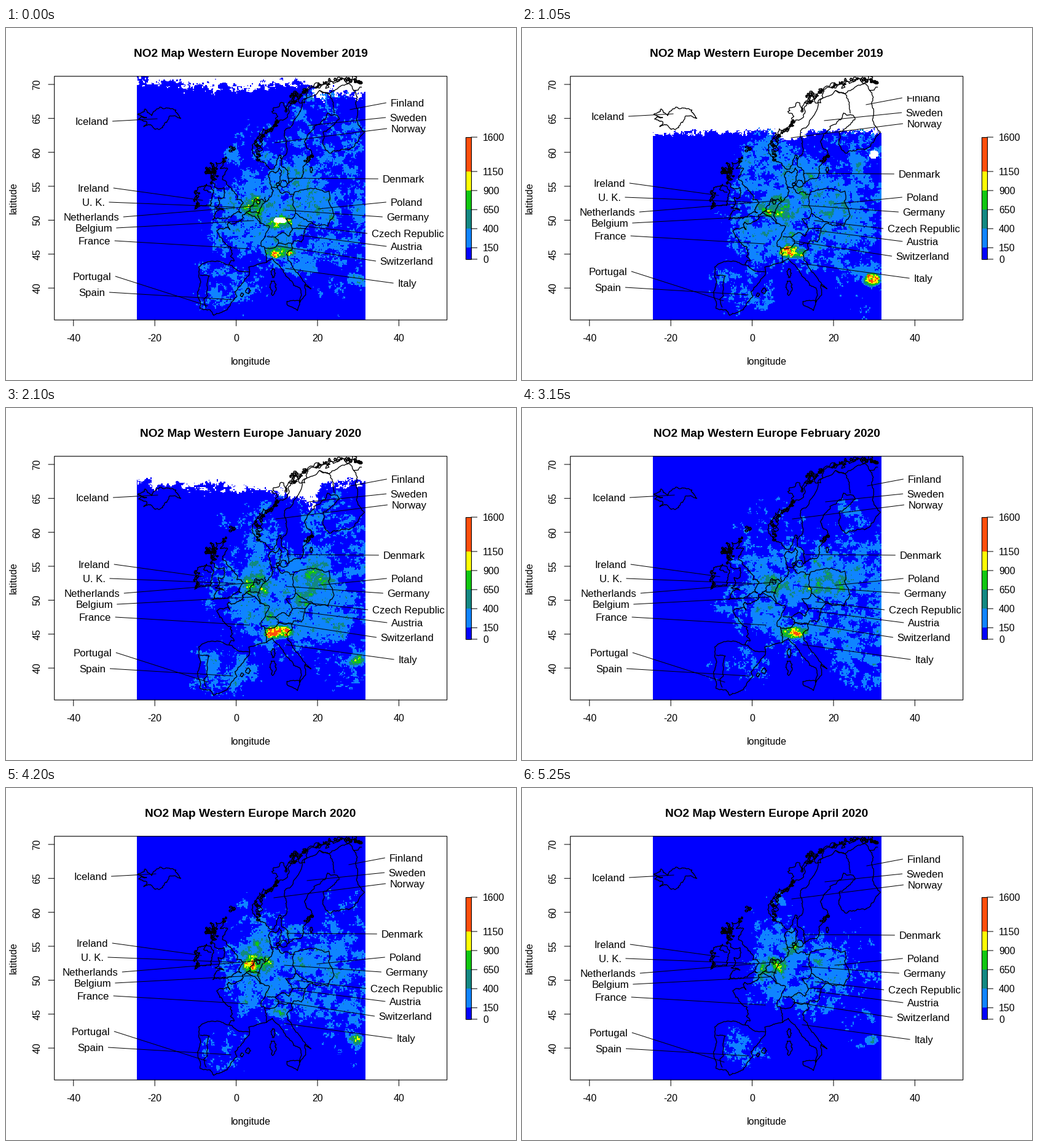
A matplotlib script for the animation above (6300 ms loop, 830 by 574 pixels).

```python
import numpy as np
import matplotlib.pyplot as plt
from matplotlib.animation import FuncAnimation
from matplotlib.colors import to_rgba_array
from matplotlib.patches import Rectangle
from matplotlib.transforms import Affine2D

W, H = 830, 574
PX = 0.72  # points per pixel at 100 dpi
LEFT, RIGHT, TOP, BOTTOM = 212.5, 584, 78.7, 476.1
COLORS = ["#0000ff", "#0f84ff", "#128882", "#10c810", "#ffff00", "#ff4e0a"]
LEVELS = [0, 150, 400, 650, 900, 1150, 1600]

plt.rcParams["font.family"] = "Liberation Sans"
fig = plt.figure(figsize=(8.3, 5.74), dpi=100, facecolor="white")
ax = fig.add_axes([0, 0, 1, 1])
ax.axis("off")


def text(x, y, s, size=16, **kw):
    return ax.text(x, y, s, fontsize=size * PX, va="baseline", **kw)


def line(xs, ys, width=1.0, **kw):
    return ax.plot(xs, ys, color="black", lw=width * PX, snap=False, **kw)[0]


def lon_x(lon):
    return 374.6 + 6.62 * lon


def lat_y(lat):
    return 92 + 11.07 * (70 - lat)


# ---------------------------------------------------------------- field
NX, NY = 248, 265
gx, gy = np.meshgrid(LEFT + (np.arange(NX) + 0.5) * (RIGHT - LEFT) / NX,
                     TOP + (np.arange(NY) + 0.5) * (BOTTOM - TOP) / NY)


def noise(rng, cutoff=0.025, power=0.68):
    """Clumpy random field with unit spread."""
    fx, fy = np.meshgrid(np.fft.fftfreq(NX), np.fft.fftfreq(NY))
    amp = (fx**2 + fy**2 + cutoff**2) ** -power
    n = np.fft.ifft2(np.fft.fft2(rng.normal(size=(NY, NX))) * amp).real
    return (n - n.mean()) / n.std()


def hill(x, y, rx, ry):
    """Flat-topped ellipse that fades out past its radii."""
    d = ((gx - x) / rx) ** 2 + ((gy - y) / ry) ** 2
    return np.exp(-0.25 * d**2)


# centre and radii of the polluted regions
REGIONS = [
    (455, 305, 105, 78),   # continent
    (405, 210, 52, 55),    # North Sea
    (552, 305, 55, 130),   # east
    (360, 425, 52, 45),    # Iberia
    (520, 165, 70, 60),    # Scandinavia
    (410, 290, 24, 17),    # Benelux
    (495, 288, 38, 20),    # Poland
    (442, 366, 18, 8),     # Po valley
    (568, 411, 11, 8),     # Bosphorus
    (443, 318, 18, 10),    # Bavaria
]


def month(seed, heights, reach=1.0, edge=None, ragged=0, hole=None):
    """Colour image of one month; there is no data above edge or in the hole."""
    rng = np.random.default_rng(seed)
    hills = [h * hill(x, y, rx * reach, ry * reach)
             for h, (x, y, rx, ry) in zip(heights, REGIONS)]
    value = np.max(hills, axis=0) * np.exp(0.3 * noise(rng))
    rgba = to_rgba_array(COLORS)[np.clip(value.astype(int), 0, 5)]
    rag = noise(rng, 0.06)
    if edge:
        rgba[gy < np.interp(gx, edge[::2], edge[1::2]) + ragged * rag] = 1
    if hole:
        rgba[hill(*hole) + 0.1 * rag > 0.7] = 1
    return rgba


months = [
    ("November 2019", (0, 8), month(
        11, [1.35, .92, 1, .92, .82, 2.6, 1.8, 3.5, 2.5, 3.4],
        edge=[212, 88, 375, 97, 480, 92, 510, 108, 584, 110], ragged=6,
        hole=(446, 314, 10, 4))),
    ("December 2019", (0, 0), month(
        12, [1.35, .9, 1.15, .9, .85, 2.6, 2, 4.1, 3.8],
        edge=[212, 172, 404, 169, 435, 184, 475, 168, 584, 172], ragged=3,
        hole=(572, 207, 6, 6))),
    ("January 2020", (1, 2), month(
        13, [1.35, .98, 1.05, 1, .85, 2.5, 2, 5.4, 2.3],
        edge=[212, 120, 440, 137, 500, 158, 515, 126, 584, 122], ragged=6)),
    ("February 2020", (2, 2), month(
        14, [1.3, .85, 1.05, .72, .3, 2.5, 1.7, 3.9, 2.1])),
    ("March 2020", (-2, 0), month(
        15, [1.25, .76, 1, .68, .3, 2.9, 1.6, 1.9, 2.3], reach=.88)),
    ("April 2020", (1, 2), month(
        16, [1.25, .72, .74, .85, .3, 2.6, 1.4, 1.2, 1.9], reach=.78)),
]

raster = ax.imshow(months[0][2], extent=(LEFT, RIGHT, BOTTOM, TOP), aspect="auto",
                   interpolation="nearest", zorder=1)
ax.set_xlim(0, W)
ax.set_ylim(H, 0)
ax.autoscale(False)

# ---------------------------------------------------------------- outlines
box = ax.add_patch(Rectangle((78.7, TOP), 639, BOTTOM - TOP, fill=False, ec="black",
                             lw=1.1 * PX, snap=False, zorder=4))
shape_rng = np.random.default_rng(5)


def trace(p, rough, depth=4):
    """Rough line through pixel points, by midpoint displacement."""
    for _ in range(depth):
        step = np.diff(p, axis=0)
        normal = np.column_stack([-step[:, 1], step[:, 0]])
        out = np.empty((2 * len(p) - 1, 2))
        out[::2] = p
        out[1::2] = p[:-1] + step / 2 + normal * shape_rng.normal(0, rough, (len(step), 1))
        p = out
    line(p[:, 0], p[:, 1], 1.3, zorder=3).set_clip_path(box)


def points(coords):
    return np.column_stack([lon_x(np.array(coords[::2])), lat_y(np.array(coords[1::2]))])


def coast(*coords, rough=.15):
    trace(points(coords), rough, 5)


def border(*coords):
    trace(points(coords), .1)


def isle(x, y, rx, ry):
    a = np.linspace(0, 2 * np.pi, 7)
    trace(np.column_stack([x + rx * np.cos(a), y + ry * np.sin(a)]), .18, 3)


def skerries(count, spread, *coords):
    """Small islands and inlets scattered along a path."""
    p = points(coords)
    for t in shape_rng.uniform(0, len(p) - 1, count):
        i = int(t)
        x, y = p[i] + (t - i) * (p[i + 1] - p[i]) + shape_rng.normal(0, spread, 2)
        isle(x, y, *shape_rng.uniform(.8, 3, 2))


# Iceland, Ireland, Great Britain
coast(-22.7, 63.8, -18.8, 63.4, -13.6, 65, -14.8, 66.2, -16.4, 66.5, -20.3, 66,
      -20.8, 65.4, -22.4, 66.4, -24.2, 65.6, -22, 65.1, -24, 64.9, -22, 64.5, -22.7, 63.8)
coast(-6.3, 52.2, -10.2, 51.6, -9.5, 52.6, -10, 54.2, -8.4, 55, -7.3, 55.3, -5.5, 54.4,
      -6, 53, -6.3, 52.2)
border(-7.3, 55.1, -8, 54.5, -6.2, 54.1)
coast(-5.7, 50.1, 1.3, 51.1, .6, 51.5, 1.7, 52.6, .2, 53, -1.4, 54.8, -3.4, 56,
      -2.1, 57.6, -3.9, 57.6, -3.1, 58.6, -5, 58.5, -5.6, 56.4, -5.1, 54.8, -3, 54.8,
      -3.1, 53.3, -4.5, 53.3, -5.2, 51.8, -3, 51.5, -5.7, 50.1)
skerries(8, 2, -10, 51.7, -9.5, 54.2)
skerries(20, 3, -5.2, 55.6, -6.2, 57.2, -5.4, 58.2)
skerries(9, 2, -7.4, 57, -6.4, 58.3)
skerries(8, 2, -3.2, 58.8, -.9, 60.7)

# France, Iberia, Italy
coast(2.5, 51.1, 1.5, 50.1, -1.1, 49.4, -1.9, 49.7, -1.5, 48.6, -4.7, 48.5, -1.2, 46,
      -1.7, 43.4)
coast(-1.7, 43.4, -7.7, 43.7, -9.2, 43.1, -8.7, 40.9, -9.4, 38.8, -8.9, 37, -6.4, 36.8,
      -5.6, 36, -2.2, 36.8, .2, 38.8, -.3, 39.5, 3.2, 41.9, 3.1, 43.1, 7.5, 43.8, rough=.08)
coast(7.5, 43.8, 8.9, 44.4, 10.3, 43.5, 12.3, 41.7, 15.7, 40, 15.7, 37.9, 17.1, 39,
      16.9, 40.5, 18.4, 39.9, 16, 41.5, 13.6, 43.5, 12.4, 45, 13.7, 45.6, rough=.08)
coast(12.5, 38, 15.6, 38.2, 15.1, 36.7, 12.5, 37.6, 12.5, 38, rough=.08)
border(-1.7, 43.4, 3.1, 42.4)
border(-8.8, 41.9, -6.6, 41.8, -7.4, 37.2)
border(7.5, 43.8, 7, 45.9, 6.1, 46.2, 8.2, 49, 5.8, 49.5, 2.5, 51.1)

# central Europe
border(7, 45.9, 9, 45.9, 10.4, 46.6, 13.7, 46.5, 13.7, 45.6)
border(7.6, 47.6, 9.5, 47.5, 13, 47.6, 13.8, 48.7)
border(9.6, 47.5, 10.4, 46.6)
border(13.8, 48.7, 12.2, 50.2, 14.6, 51, 18.8, 49.6, 17, 48.8, 13.8, 48.7)
border(17, 48.8, 16.1, 46.8, 13.7, 46.5)
border(14.6, 51, 14.2, 53.9, 18.5, 54.7, 22.8, 54.3, 23.9, 50.5, 22.6, 49.1, 18.8, 49.5)
border(7.1, 53.4, 6, 51.8, 6.2, 49.5)
border(3.4, 51.3, 5.8, 51)
border(8.7, 54.9, 10, 54.8)
coast(14.2, 53.9, 11, 54, 10, 54.8, 10.8, 56.3, 10.6, 57.7, 8.2, 57, 8.7, 54.9,
      8.9, 53.9, 4.9, 53.2, 3.4, 51.4, 2.5, 51.1)

# Corsica, Sardinia, Balearics, IJsselmeer, Danish islands, Gotland
for lon, lat, rx, ry in [(9.1, 42.2, 3, 8), (9, 40.1, 5, 12), (1.4, 39, 2.5, 3),
                         (2.9, 39.6, 4, 4), (5.4, 52.7, 3, 4), (11.7, 55.4, 6, 6),
                         (10.3, 55.3, 3, 3), (18.5, 57.4, 2, 5)]:
    isle(lon_x(lon), lat_y(lat), rx, ry)

# Scandinavia
coast(11.2, 59, 12.9, 55.4, 14.6, 56.1, 16.3, 56.5, 16.7, 58, 18.7, 59.8, 17.2, 60.8,
      17.5, 62.4, 21.4, 64.8, 22.5, 65.8, 25.3, 65, 21.4, 63, 21.3, 61.2, 22.9, 59.9,
      28, 60.5, rough=.11)
border(28, 60.5, 31.5, 62.9, 29.8, 64.5, 29.5, 67.5, 28.9, 69.1)
border(11.2, 59, 12.3, 61, 12.1, 63.3, 14, 64.2, 16.2, 67.5, 20.5, 69.1, 23.6, 67.8,
       24.1, 65.8)
border(20.5, 69.1, 23, 68.7, 27.9, 70.1, 28.9, 69.1, 30.8, 69.6)
fjords = [5.6, 58.8, 5.1, 62, 9.5, 63.9, 13.5, 67.2, 17.5, 69.3, 25.7, 70.9, 31, 70.2]
coast(11.2, 59, 10.6, 59.6, 7.5, 58, *fjords)
coast(*fjords, rough=.25)
skerries(65, 1.6, *fjords)
skerries(8, 2, 13.2, 68, 15.5, 68.9)
skerries(7, 1.5, 17, 58.6, 18.8, 59.6)

# ---------------------------------------------------------------- axes
for v in range(-40, 41, 20):
    line([lon_x(v)] * 2, [BOTTOM, BOTTOM + 9.6], zorder=4)
    text(lon_x(v), 511, str(v), ha="center")
for v in range(40, 71, 5):
    line([69.1, 78.7], [lat_y(v)] * 2, zorder=4)
    text(55.5, lat_y(v), str(v), ha="center", rotation=90, rotation_mode="anchor")
text(398, 549.5, "longitude", ha="center")
text(17.3, 277.5, "latitude", ha="center", rotation=90, rotation_mode="anchor")
title = text(398, 47, "", 19.2, ha="center", weight="bold")


def bar_y(v):
    return 377 - 199 * v / 1600


for low, high, color in zip(LEVELS, LEVELS[1:], COLORS):
    ax.add_patch(Rectangle((748, bar_y(high)), 9, bar_y(low) - bar_y(high),
                           fc=color, ec="none"))
ax.add_patch(Rectangle((748, 178), 9, 199, fill=False, ec="black", lw=1.1 * PX))
for v in LEVELS:
    line([757, 766.6], [bar_y(v)] * 2)
    text(776, bar_y(v) + 6, str(v))

# ---------------------------------------------------------------- labels
# name, centre x, baseline, pointer tip
LABELS = [
    ("Iceland", 139.5, 150, 246, 140), ("Ireland", 142.5, 259, 320, 273),
    ("U. K.", 142.5, 282, 372, 284), ("Netherlands", 139, 306, 410, 282),
    ("Belgium", 142.5, 324, 403, 306), ("France", 144, 345, 395, 352),
    ("Portugal", 140, 403, 328, 445), ("Spain", 140, 429, 368, 435),
    ("Finland", 653, 120, 560, 125), ("Sweden", 655, 144, 492, 151),
    ("Norway", 655, 162, 438, 179), ("Denmark", 646.5, 244, 458, 237),
    ("Poland", 651.5, 282, 508, 287), ("Germany", 654, 306, 455, 289),
    ("Czech Republic", 653.5, 333, 476, 314), ("Austria", 652, 354, 478, 330),
    ("Switzerland", 652, 378, 440, 347), ("Italy", 652.5, 414, 455, 384),
]
shift = Affine2D()
moved = shift + ax.transData
for name, x, y, tip_x, tip_y in LABELS:
    label = text(x, y, name, 16.7, ha="center", transform=moved, zorder=5)
    reach = label.get_window_extent().width / 2 + 7
    start = x + reach if tip_x > x else x - reach
    line([start, tip_x], [y - 6, tip_y], transform=moved, zorder=5)
cover = ax.add_patch(Rectangle((622, 100), 66, 10.5, fc="white", ec="none", zorder=6))


def update(i):
    name, offset, image = months[i]
    title.set_text("NO2 Map Western Europe " + name)
    raster.set_data(image)
    shift.clear().translate(*offset)
    cover.set_visible(name.startswith("December"))
    return raster, title, cover


anim = FuncAnimation(fig, update, frames=len(months), interval=1050,
                     repeat=True, repeat_delay=0, blit=False)
plt.show()
```
